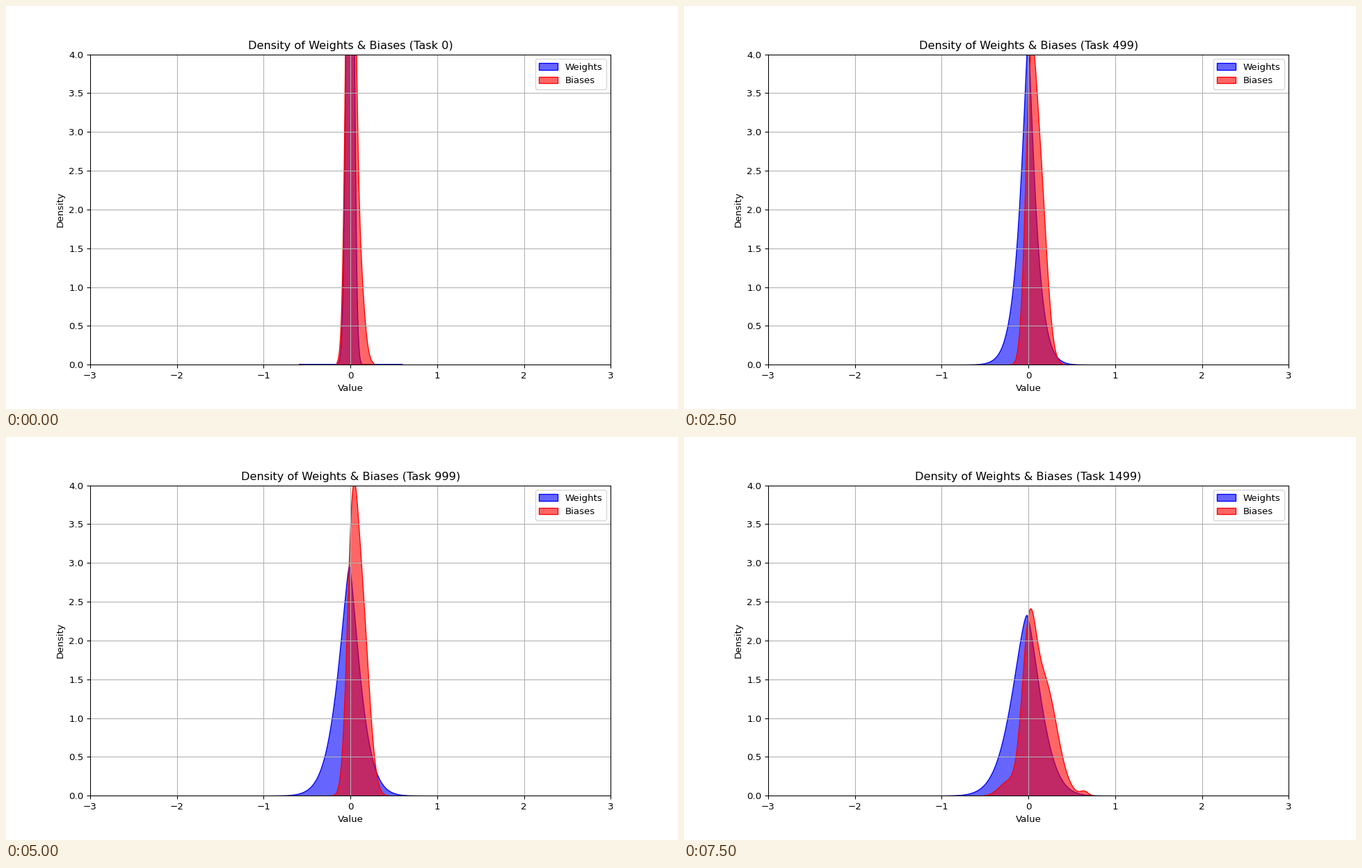
A matplotlib script that plays this animation: 966x580 px, repeating every 8000 ms.

```python
import numpy as np
import matplotlib.pyplot as plt
from matplotlib.animation import FuncAnimation

FRAMES, INTERVAL = 16, 500
POINTS = 200

# Short-lived outlying biases: step -> (centre, height, sigma)
OUTLIERS = {
    4: ((-.72, .04, .033), (.72, .04, .033)),
    13: ((-.2, .17, .04),),
    15: ((-.25, .16, .1), (.64, .055, .045)),
}


def gauss(x, centre, height, sigma):
    return height * np.exp(-((x - centre) / sigma) ** 2 / 2)


def weight_curve(k):
    """A Gaussian start that turns sharp-peaked, then spreads out."""
    peak = 1 / (.096 + .03815 * k ** .8)
    centre = -.0015 * k
    power = 1.1 + .027 * k + .9 * np.exp(-2 * k)
    width = .055 + .0166 * k ** .9
    x = np.linspace(-.59 - .04 * k, .6 + .027 * k, POINTS)
    d = x - centre
    side = np.where(d < 0, width, .92 * width)
    return x, peak * np.exp(-(np.abs(d) / side) ** power)


def bias_curve(k):
    """A main bump and a right shoulder: quick settling, late widening."""
    settle = np.exp(-k)
    late = (k / 15) ** 8
    main = (.016 - .016 * (settle + late),
            2.75 + 6 * settle - 1.2 * late,
            .06 - .015 * settle + .017 * late)
    shoulder = (.12 - .04 * settle + .05 * late,
                2.5 - .9 * settle - late,
                .083 - .02 * settle + .067 * late)
    outliers = OUTLIERS.get(k, ())
    lo = min([-.2 - .006 * k + .045 * settle - .23 * late]
             + [c - 2.7 * s for c, _, s in outliers])
    hi = max([.44 - .17 * settle + .3 * late]
             + [c + 2.7 * s for c, _, s in outliers])
    x = np.linspace(lo, hi, POINTS)
    return x, sum(gauss(x, *part) for part in (main, shoulder, *outliers))


def outline(x, y):
    return np.r_[[(x[0], 0)], np.c_[x, y], [(x[-1], 0)]]


fig, ax = plt.subplots(figsize=(10, 6.00415), dpi=96.6)
ax.set(xlim=(-3, 3), ylim=(0, 4), xlabel="Value", ylabel="Density")
ax.grid(True)


def area(color, label):
    return ax.fill_between([0, 1], [0, 0], facecolor=(*color, .6),
                           edgecolor=color, linewidth=1, label=label)


weights = area((0, 0, 1), "Weights")
biases = area((1, 0, 0), "Biases")
ax.legend(loc="upper right")
title = ax.set_title("")


def update(k):
    weights.set_verts([outline(*weight_curve(k))])
    biases.set_verts([outline(*bias_curve(k))])
    title.set_text(f"Density of Weights & Biases (Task {max(0, 100 * k - 1)})")
    return weights, biases, title


anim = FuncAnimation(fig, update, frames=FRAMES, interval=INTERVAL,
                     repeat=True, repeat_delay=0, blit=False)
plt.show()
```
